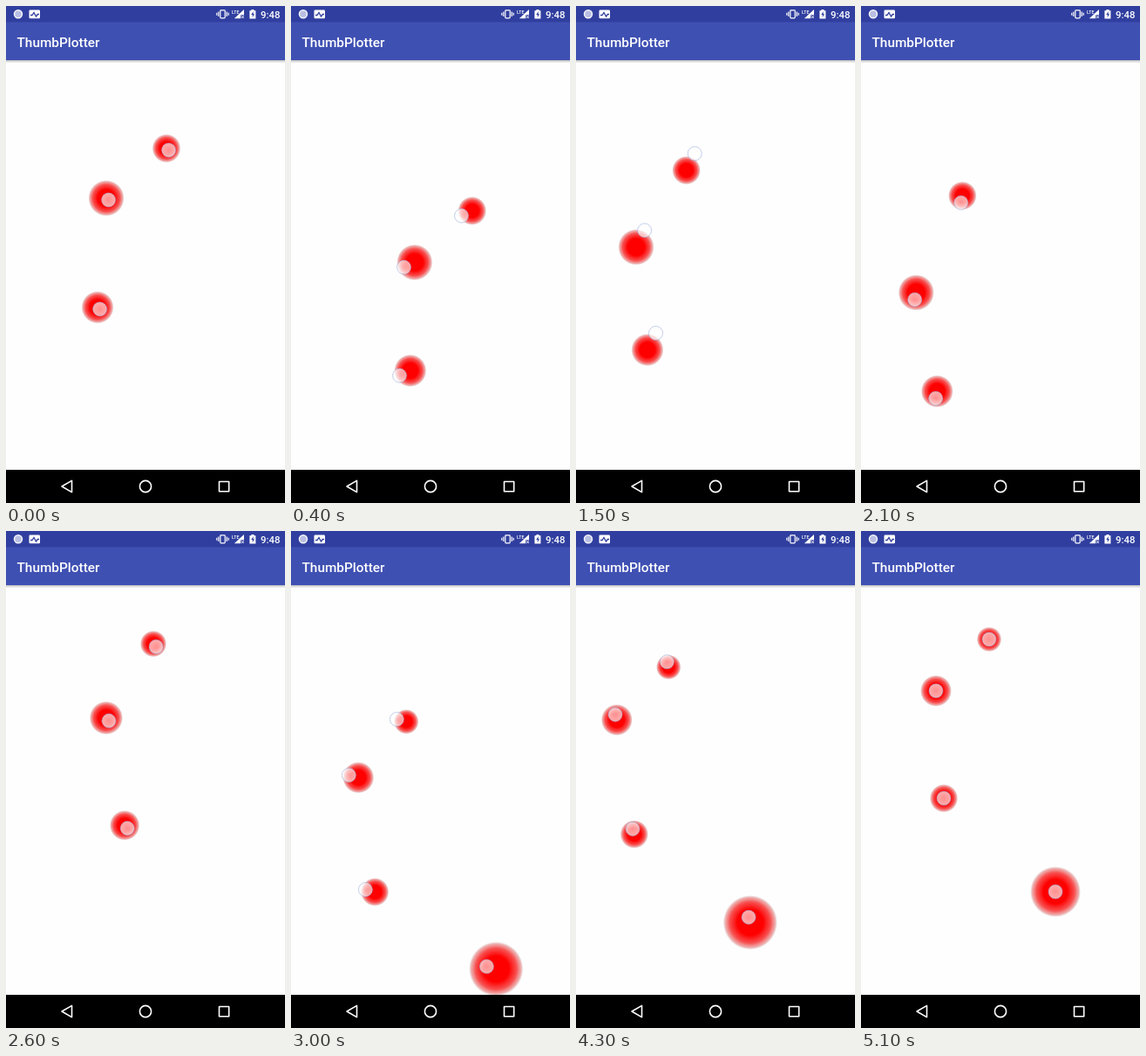
These frames come from a looping animation (320 px wide and 569 px high, 5.2 s). An HTML page without scripts:

```html
<!DOCTYPE html>
<html lang="en">
<head>
<meta charset="utf-8">
<title>ThumbPlotter</title>
<style>
  @property --x { syntax: "<length>"; inherits: false; initial-value: 0px; }
  @property --y { syntax: "<length>"; inherits: false; initial-value: 0px; }

  html, body { margin: 0; width: 100%; height: 100%; overflow: hidden; background: #fefefe; }
  svg { display: block; width: 100vw; height: 100vh; }
  text { font-family: Roboto, sans-serif; font-weight: 500; fill: #fff; }
  .line { fill: none; stroke: #fff; stroke-width: 1.6; stroke-linejoin: round; }
  .icon { fill: #fff; }

  .blob { fill: url(#glow); animation: ease-off 5.2s linear infinite; }
  .tip { fill: url(#gloss); stroke: #93a7d6; stroke-opacity: .55; }

  /* The hand loops: x and y swing like sines between their turning points */
  .hand {
    translate: var(--x) var(--y);
    animation: swing-x 5.2s infinite, swing-y 5.2s infinite;
    animation-timing-function: cubic-bezier(.37, 0, .63, 1);
  }
  /* The pointer is half a step ahead of the blob */
  .ahead { animation-delay: -.05s; }

  @keyframes swing-x {
    0% { --x: 115px; }
    5.77% { --x: 153px; }
    13.08% { --x: 84px; }
    21.15% { --x: 168px; }
    28.46% { --x: 68px; }
    34.62% { --x: 160px; }
    40.96% { --x: 61.5px; }
    51.92% { --x: 119px; }
    63.46% { --x: 36px; }
    75.96% { --x: 82px; }
    83.85% { --x: 45px; }
    89.81% { --x: 92px; }
    92.31%, 100% { --x: 86px; }
  }
  @keyframes swing-y {
    0% { --y: 220px; }
    9.62% { --y: 301px; }
    15.77% { --y: 224px; }
    23.85% { --y: 360px; }
    31.92% { --y: 238px; }
    43.08% { --y: 342px; }
    50% { --y: 214px; }
    56.92% { --y: 283px; }
    71.92% { --y: 177px; }
    81.54% { --y: 219px; }
    88.46% { --y: 178px; }
    92.31%, 100% { --y: 183px; }
  }

  /* Each finger drifts a little relative to the middle one */
  .index { animation: index 5.2s linear infinite; }
  .ring { animation: ring 5.2s linear infinite; }
  .thumb { animation: thumb 5.2s linear infinite; }
  .thumb .blob { animation-name: thumb-press; }

  @keyframes index {
    0% { translate: 69px -57px; }
    15.38% { translate: 63px -61px; }
    40.38% { translate: 53px -111px; }
    57.69% { translate: 55px -64px; }
    92.31%, 100% { translate: 61px -59px; }
  }
  @keyframes ring {
    0% { translate: -10px 125px; }
    15.38% { translate: 0 123px; }
    40.38% { translate: 24px 113px; }
    57.69% { translate: 19px 131px; }
    69.23% { translate: 10px 129px; }
    82.69% { translate: 20px 131px; }
    92.31%, 100% { translate: 9px 123px; }
  }
  @keyframes thumb {
    0%, 53.84% { opacity: 0; translate: 158px 219px; }
    53.85% { opacity: 1; }
    57.69% { translate: 158px 219px; }
    69.23% { translate: 136px 233px; }
    82.69% { translate: 153px 232px; }
    92.31%, 100% { opacity: 1; translate: 137px 230px; }
  }
  @keyframes ease-off {
    0%, 40% { scale: 1; }
    57.69%, 100% { scale: .87; }
  }
  @keyframes thumb-press {
    0%, 57.69%, 82.69% { scale: 1; }
    69.23% { scale: .87; }
    92.31%, 100% { scale: .93; }
  }
</style>
</head>
<body>
<svg viewBox="0 0 320 569">
  <defs>
    <radialGradient id="glow">
      <stop offset=".48" stop-color="#f00"/>
      <stop offset=".76" stop-color="#f51616" stop-opacity=".75"/>
      <stop offset=".93" stop-color="#dc4a4a" stop-opacity=".43"/>
      <stop offset="1" stop-color="#b09090" stop-opacity=".08"/>
    </radialGradient>
    <radialGradient id="gloss">
      <stop offset="0" stop-color="#fff" stop-opacity=".56"/>
      <stop offset="1" stop-color="#fff" stop-opacity=".68"/>
    </radialGradient>
    <linearGradient id="shade" x2="0" y2="1">
      <stop offset="0" stop-opacity=".25"/>
      <stop offset="1" stop-opacity="0"/>
    </linearGradient>
  </defs>

  <rect width="320" height="569" fill="#fefefe"/>

  <g class="index">
    <g class="hand"><circle class="blob" r="16.2"/></g>
    <g class="hand ahead"><circle class="tip" r="8"/></g>
  </g>
  <g class="middle">
    <g class="hand"><circle class="blob" r="20.5"/></g>
    <g class="hand ahead"><circle class="tip" r="8"/></g>
  </g>
  <g class="ring">
    <g class="hand"><circle class="blob" r="18.4"/></g>
    <g class="hand ahead"><circle class="tip" r="8"/></g>
  </g>
  <g class="thumb">
    <g class="hand"><circle class="blob" r="31"/></g>
    <g class="hand ahead"><circle class="tip" r="8"/></g>
  </g>

  <!-- App bar and status bar -->
  <rect y="62" width="320" height="3.5" fill="url(#shade)"/>
  <rect width="320" height="62" fill="#3f50b3"/>
  <rect width="320" height="18.5" fill="#303f9f"/>
  <text x="12.5" y="46.5" font-size="15.4">ThumbPlotter</text>

  <circle cx="14" cy="9.3" r="4.5" fill="#b9bfe2" stroke="#f4f5fb" stroke-width="1.5"/>
  <rect class="icon" x="26.5" y="4.5" width="12.5" height="9.8" rx="1.2"/>
  <path d="M28 10.5h2l2-3 2.5 4.5 1.8-2.5H38" fill="none" stroke="#303f9f" stroke-width="1.3"/>

  <g fill="none" stroke="#fff" stroke-width="1.2">
    <rect x="245.8" y="4.8" width="5.4" height="9" rx=".8"/>
    <path d="M243.8 6.5v5.6M241.8 7.8v3M253.2 6.5v5.6M255.2 7.8v3"/>
  </g>
  <text x="259" y="9" font-size="5.2">LTE</text>
  <path class="icon" d="M273 4v6.2h-3.8v4.1h-7.4z"/>
  <path d="M270.2 11.2l2.6 2.8m0-2.8l-2.6 2.8" stroke="#fff"/>
  <path class="icon" d="M279.4 5.2h2v-1.2h3v1.2h2v9.2h-7z"/>
  <path d="M283.6 6.3l-2.4 3.8h1.5v2.9l2.3-3.8h-1.4z" fill="#303f9f"/>
  <text x="292" y="13.6" font-size="11.4">9:48</text>

  <!-- Navigation bar -->
  <rect y="531" width="320" height="38"/>
  <g class="line">
    <path d="M64 550l11.5-6.6v13.2z"/>
    <circle cx="160" cy="550" r="6.6"/>
    <rect x="244.5" y="544.5" width="11.2" height="11.2"/>
  </g>
</svg>
</body>
</html>
```
